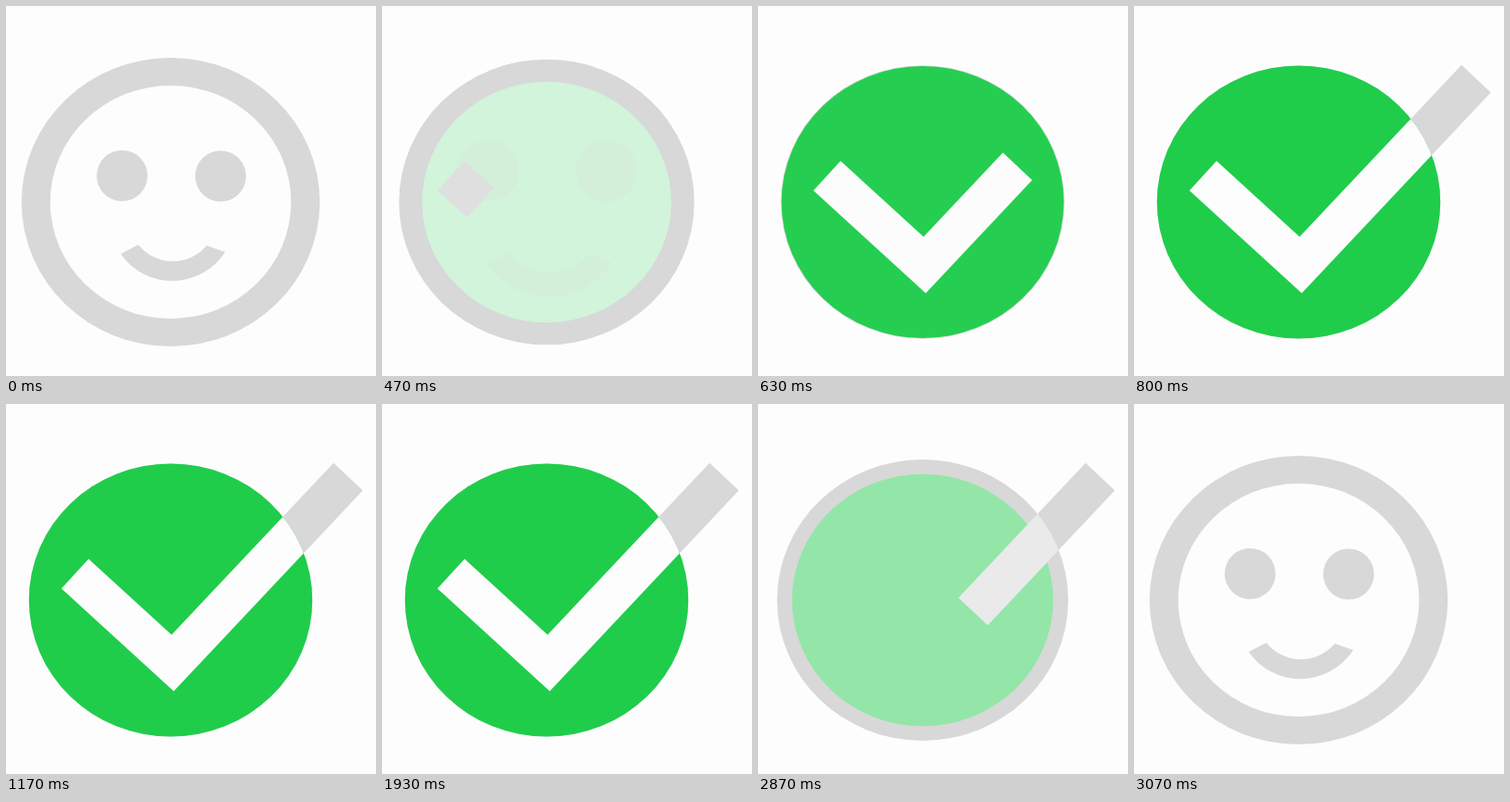
An HTML page with a canvas for the animation above (3.91 s loop, 400x400 px).

```html
<!DOCTYPE html>
<html lang="en">
<head>
<meta charset="utf-8">
<title>Smiley to check mark</title>
<style>
  html, body { margin: 0; height: 100%; overflow: hidden; background: #fdfdfd; }
  canvas { display: block; width: 400px; height: 400px; }
</style>
</head>
<body>
<canvas id="stage" width="400" height="400"></canvas>
<script>
const ctx = document.getElementById('stage').getContext('2d');
const LOOP = 3910, BACK = 2770;
const PAPER = [253, 253, 253], GRAY = [216, 216, 216], GREEN = [31, 205, 75];
const CENTER = [178, 212];
const CHECK = [[74.6, 183.4], [180.2, 280], [369.9, 78.6]];
const CHECK_LENGTH = 420;
const MOUTH = new Path2D('M124 268A68 68 0 0 0 237 266L217 259A48 48 0 0 1 143 258Z');

const mix = (a, b, p) => `rgb(${a.map((v, i) => v + (b[i] - v) * p)})`;
const solid = color => mix(color, color, 0);

// Smooth progress from 0 to 1
function ease(t, start, duration) {
  const x = Math.min(1, Math.max(0, (t - start) / duration));
  return x * x * (3 - 2 * x);
}

function ellipse(x, y, rx, ry = rx) {
  ctx.beginPath();
  ctx.ellipse(x, y, rx, ry, 0, 0, 2 * Math.PI);
}

function disc(color, ...shape) {
  ctx.fillStyle = color;
  ellipse(...shape);
  ctx.fill();
}

// Eyes and mouth grow from the centre while they fade
function drawFace(on) {
  const [x, y] = CENTER;
  ctx.save();
  ctx.globalAlpha = Math.max(0, 1 - 4 * on);
  ctx.translate(x, y);
  ctx.scale(1 + on, 1 + on);
  ctx.translate(-x, -y);
  disc(solid(GRAY), 125.5, 183.5, 27.5);
  disc(solid(GRAY), 232, 184, 27.5);
  ctx.fill(MOUTH);
  ctx.restore();
}

function drawCheck(color, from, to) {
  if (to - from < 0.001) return;
  ctx.strokeStyle = color;
  ctx.lineWidth = 43.4;
  ctx.setLineDash([(to - from) * CHECK_LENGTH, 2 * CHECK_LENGTH]);
  ctx.lineDashOffset = -from * CHECK_LENGTH;
  ctx.beginPath();
  CHECK.forEach(point => ctx.lineTo(...point));
  ctx.stroke();
}

function draw(t) {
  // The way back sets in abruptly, already under way
  const undo = t < BACK ? 0 : ease(t, 2665, 400);
  const on = ease(t, 397, 260) - undo;
  const drawn = ease(t, 397, 372);
  const off = 1 - on;
  const rx = 153.2 + 8 * off, ry = 147.6 + 8.4 * off;

  ctx.fillStyle = solid(PAPER);
  ctx.fillRect(0, 0, 400, 400);
  drawCheck(solid(GRAY), undo, drawn);
  disc(solid(GRAY), ...CENTER, rx, ry);
  disc(mix(PAPER, GREEN, on), ...CENTER, rx - 31 * off, ry - 30 * off);
  drawFace(on);

  ctx.save();
  ellipse(...CENTER, rx, ry);
  ctx.clip();
  drawCheck(mix(GRAY, PAPER, on), undo, drawn);
  ctx.restore();
}

function tick() {
  draw(performance.now() % LOOP);
  requestAnimationFrame(tick);
}
tick();
</script>
</body>
</html>
```
